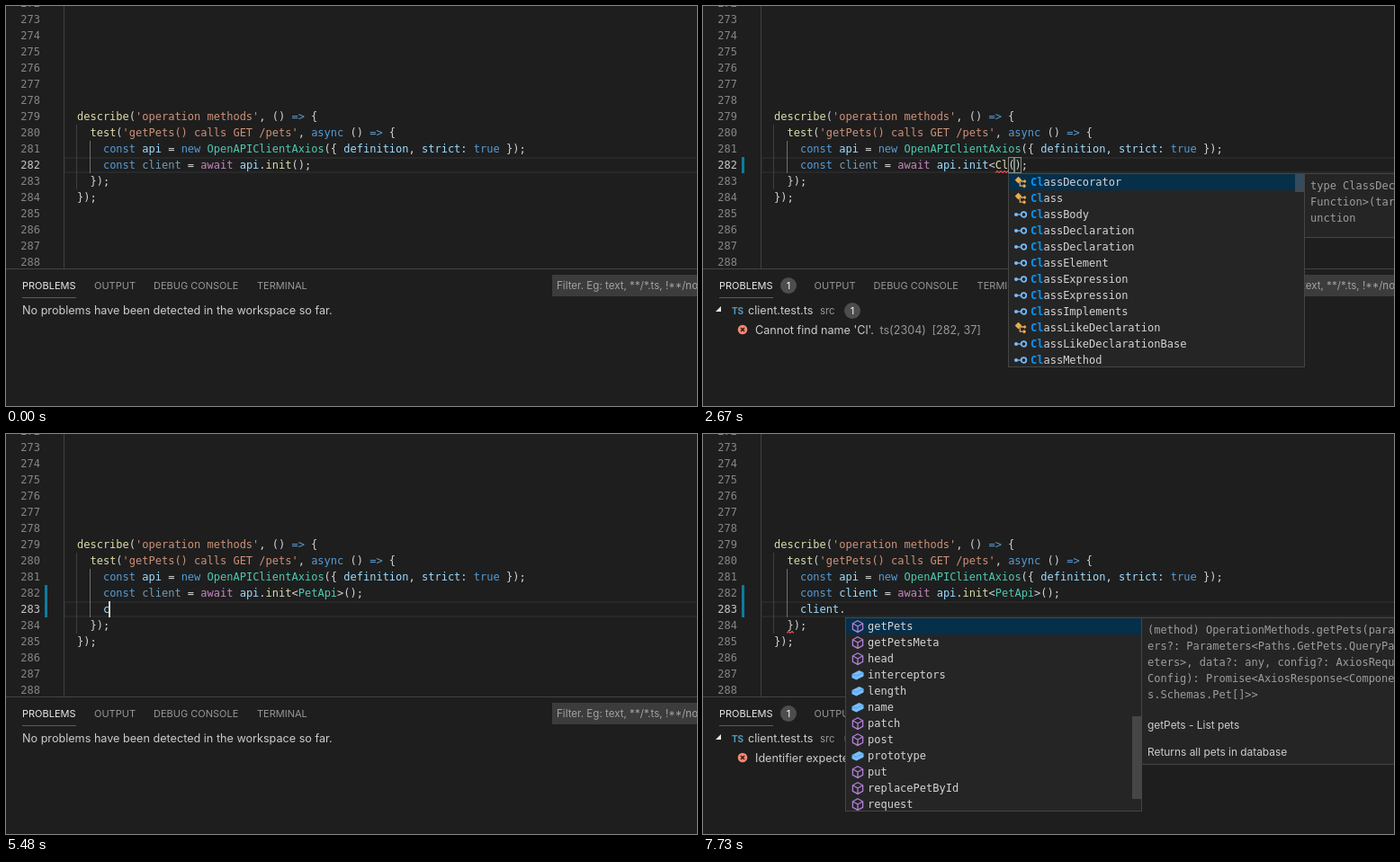
Write an HTML page that moves like this. It is 768 by 445 pixels and loops after 8000 ms.

```html
<!DOCTYPE html>
<html lang="en">
<head>
<meta charset="utf-8">
<title>Typed API client</title>
<style>
html, body { margin: 0; width: 100%; height: 100%; overflow: hidden; background: #1e1e1e; }
#stage { position: relative; width: 768px; height: 445px; overflow: hidden; background: #1e1e1e; color: #ccc; }
#stage div, #stage svg { position: absolute; box-sizing: border-box; }
.text { line-height: 18px; white-space: pre; }
.mono { font: 12px/18px "DejaVu Sans Mono", monospace; }
.ui { font: 12.64px/18px Inter, sans-serif; }
.doc { font: 11.9px/18px Inter, sans-serif; }
.tab { font: 11px/18px Inter, sans-serif; color: #979797; }
.on { color: #e7e7e7; }
.src { font-size: 11.4px; color: #979797; }
.filter { font: 11.6px/18px Inter, sans-serif; color: #a2a2a2; }
.ts { font: 700 10px/18px Inter, sans-serif; color: #519aba; }
.num { color: #858585; }
.num.now { color: #c6c6c6; }
.code { color: #d4d4d4; }
.dim { color: #9d9d9d; }
.gap { color: #979797; margin-left: 6.5px; }
.badge { width: 18px; height: 18px; border-radius: 9px; background: #4d4d4d; color: #fff;
  font: 11px/18px Inter, sans-serif; text-align: center; }
.editor { left: 0; top: 0; width: 768px; height: 292px; overflow: hidden; }
.box { background: #252526; border: 1px solid #454545; }
.clip { overflow: hidden; }
.current { border: 2px solid #282828; }
.pair { border: 1px solid #888; background: rgba(0, 100, 0, .1); }
.block { background: #aeafad; color: #1e1e1e; }
#stage i { font-style: normal; }
#stage em { font-style: italic; }
.k { color: #569cd6; } .f { color: #dcdcaa; } .s { color: #ce9178; } .v { color: #9cdcfe; }
.t { color: #4ec9b0; } .c { color: #c586c0; } .u { color: #729db3; }
.b { color: #0097fb; font-weight: bold; }
</style>
</head>
<body>
<div id="stage"></div>
<script>
const LOOP = 8000, CH = 7.224, LEFT = 64.55;
const stage = document.getElementById('stage');

const colX = col => LEFT + col * CH;
const rowY = row => 168 + (row - 282) * 18;
const esc = s => s.replace(/&/g, '&amp;').replace(/</g, '&lt;');
const MARK = /\[(\w) ([^\]]*)\]/g;
const paint = s => esc(s).replace(MARK, '<i class="$1">$2</i>');
const plain = s => s.replace(MARK, '$2');

const rect = (x, y, w, h, cls = '', fill = '', inner = '') =>
  `<div class="${cls}" style="left:${x}px;top:${y}px;width:${w}px;height:${h}px;${fill && 'background:' + fill}">${inner}</div>`;
// text whose line is centred on y
const text = (x, y, cls, html) =>
  `<div class="text ${cls}" style="left:${x}px;top:${y - 9}px">${html}</div>`;
const svg = (x, y, w, h, body) =>
  `<svg style="left:${x}px;top:${y}px" width="${w}" height="${h}" fill="none">${body}</svg>`;

const path = (d, stroke, fill = 'none', w = 1.3) =>
  `<path d="${d}" stroke="${stroke}" fill="${fill}" stroke-width="${w}"/>`;
const ICONS = {
  c: path('M5.5 1.8L9.3 5.6 5.5 9.4 1.7 5.6zM12.5 5l2 2-2 2-2-2zM12 10l2.2 2.2-2.2 2.2-2.2-2.2z', 'none', '#e8ab53') +
     path('M8 7h3M7.3 7.5v4.7h3', '#e8ab53'),
  i: '<circle cx="3" cy="8" r="2" fill="#75beff"/><circle cx="11.5" cy="8" r="2.8" stroke="#75beff" stroke-width="1.7"/>' +
     path('M4 8h5', '#75beff'),
  n: '<rect x="2.6" y="3" width="11" height="10" rx="1" stroke="#c3d9ec" stroke-width="1.2"/>' +
     path('M5 6.5h6M5 9.5h6', '#75beff'),
  m: path('M8 1.7L13.6 4.8v6.5L8 14.4 2.4 11.3V4.8zM2.4 4.8L8 8l5.6-3.2M8 8v6.4', '#b180d7'),
  p: path('M1.5 7l8-4 5 2.2v4.2l-8 4-5-2.2z', 'none', '#75beff') + path('M2 7.2l4.5 2 7.5-3.8', '#4d92cc', 'none', .8),
  a: path('M4 3.5H1.7v9H4M12 3.5h2.3v9H12', '#c3d9ec') + path('M4.2 7.6l4.3-2.2 3.2 1.4v2.6l-4.3 2.1-3.2-1.4z', 'none', '#75beff')
};

// each entry: icon letter, then the label with matched letters in brackets
const LISTS = {
  cl: {
    thumb: [0, 20],
    items: ['c[Cl]assDecorator', 'c[Cl]ass', 'i[Cl]assBody', 'i[Cl]assDeclaration', 'i[Cl]assDeclaration',
      'i[Cl]assElement', 'i[Cl]assExpression', 'i[Cl]assExpression', 'i[Cl]assImplements',
      'c[Cl]assLikeDeclaration', 'i[Cl]assLikeDeclarationBase', 'i[Cl]assMethod'],
    info: ['type ClassDecorator = <TF', 'Function>(target: TFunct', 'unction']
  },
  pet: {
    thumb: [0, 20],
    items: ['a[Pet]Api', 'n[pet]Id', 'nexample[Pet]APIJSON', 'nexample[Pet]APIYAML', 'c[P]ath[Te]mplate',
      'i[Pe]erCer[t]ificate', 'i[Pe]rformanceNode[T]iming', 'i[P]ipelin[eT]opicExpression',
      'm[p]ipelin[eT]opicExpression', 'i[Pe]rformanceEn[t]ry', 'c[P]aram[et]erDecorator', 'c[P]aram[et]ers'],
    info: ['(alias) type PetApi', 'rationMethods', 'api: OpenAPIClient', '}', 'import PetApi']
  },
  client: {
    thumb: [0, 72],
    items: ['n[client]', 'c[Client]Request', 'n[CLIENT]_RENEG_LIMIT', 'n[CLIENT]_RENEG_WINDOW',
      'm[cle]ar[Int]erval', 'm[cle]ar[Int]erval', 'mcreate[Client]', 'nSSL_OP_SSLEAY_080_[CLIENT]_DH_BUG',
      'm[cl]ass[I]mplem[ent]s', 'm[c]reate[Li]t[e]ral[T]ype[N]ode', 'mis[Cl]ass[I]mplem[ent]s', 'm[c]omp[ile]Fu[n]c[t]ion'],
    info: ['const client: OpenAPIClient<OperationMeth', 'ods>']
  },
  members: {
    thumb: [109, 92],
    items: ['mgetPets', 'mgetPetsMeta', 'mhead', 'pinterceptors', 'plength', 'pname', 'mpatch', 'mpost',
      'pprototype', 'mput', 'mreplacePetById', 'mrequest'],
    info: ['(method) OperationMethods.getPets(paramet', 'ers?: Parameters<Paths.GetPets.QueryParam',
      'eters>, data?: any, config?: AxiosRequest', 'Config): Promise<AxiosResponse<Component', 's.Schemas.Pet[]>>'],
    doc: ['getPets - List pets', 'Returns all pets in database']
  }
};

const cannotFind = name => [`Cannot find name '${name}'.`, 2304, '282, 37'];

// caret: 0 hidden, 1 bar, 2 block
const STEPS = [
  [0, { arg: '', at: 31, caret: 0, call: null, mod: 0, prob: null, wave: null, hint: 0, pop: null, info: 0, used: 0 }],
  [150, { caret: 2 }],
  [600, { caret: 0 }],
  [1050, { caret: 2 }],
  [1200, { at: 35 }],
  [1350, { caret: 1 }],
  [1640, { arg: '<', at: null }],
  [1790, { hint: 1 }],
  [1930, { prob: ['Expression expected.', 1109, '282, 38'], wave: [282, 37, 1], mod: 1 }],
  [2080, { arg: '<C', wave: [282, 38, 1] }],
  [2220, { arg: '<Cl', wave: [282, 39, 1] }],
  [2370, { hint: 0, pop: 'cl' }],
  [2520, { info: 1 }],
  [2670, { prob: cannotFind('Cl'), wave: [282, 36, 2], caret: 0 }],
  [2820, { arg: '<C', wave: [282, 36, 1], caret: 1 }],
  [2970, { arg: '<', pop: null, info: 0 }],
  [3110, { arg: '<P', wave: [282, 37, 1] }],
  [3260, { arg: '<Pe', wave: [282, 38, 1], pop: 'pet' }],
  [3400, { arg: '<Pet', wave: [282, 39, 1], info: 1 }],
  [3700, { arg: '<PetApi', wave: [282, 36, 6], pop: null, info: 0, prob: cannotFind('Pet') }],
  [4150, { caret: 0, prob: ["'PetApi' only refers to a type, but is being used as a value here.", 2693, '282, 37'] }],
  [4300, { arg: '<PetApi>', caret: 1 }],
  [4590, { prob: null, wave: null }],
  [4740, { caret: 2, at: 42 }],
  [4890, { caret: 1, at: null, call: '', mod: 2 }],
  [5180, { caret: 0 }],
  [5480, { call: 'c', caret: 1 }],
  [5630, { call: 'cl' }],
  [5780, { call: 'clie', pop: 'client' }],
  [5930, { call: 'clien', info: 1 }],
  [6080, { call: 'client' }],
  [6230, { call: 'client.', pop: 'members' }],
  [6530, { used: 1 }],
  [6680, { caret: 0, prob: ['Identifier expected.', 1003, '284, 5'], wave: [284, 4, 1] }],
  [7130, { caret: 1 }],
  [7730, { caret: 0 }]
];
let last = {};
const states = STEPS.map(([time, change]) => ({ time, state: last = { ...last, ...change } }));

function initCall(arg) {
  if (!arg) return '[f init]';
  if (arg.endsWith('>')) return `[f init]<[t ${arg.slice(1, -1)}]>`;
  return `[v init]<[f ${arg.slice(1)}]`;
}

function codeLines(s) {
  const lines = [
    "  [f describe]([s 'operation methods'], () [k =>] {",
    "    [f test]([s 'getPets() calls GET /pets'], [k async] () [k =>] {",
    '      [k const] [v api] = [k new] [t OpenAPIClientAxios]({ [v definition], [v strict:] [k true] });',
    `      [k const] [${s.used ? 'v' : 'u'} client] = [c await] [v api].${initCall(s.arg)}();`
  ];
  if (s.call !== null) lines.push('      ' + s.call.replace('client', '[v client]').replace(/^c\w*$/, '[v $&]'));
  return [...lines, '    });', '  });'];
}

function cursorOf(s) {
  if (s.call !== null) return { row: 283, col: 6 + s.call.length };
  return { row: 282, col: s.at ?? 35 + s.arg.length };
}

function squiggle([row, col, len]) {
  const w = len * CH;
  let d = 'M0 2.5';
  for (let x = 0; x < w; x += 4) d += 'l2 -2l2 2';
  return svg(colX(col), rowY(row) + 15, w, 3, path(d, '#f14c4c', 'none', 1.1));
}

function editor(s) {
  const { row, col } = cursorOf(s), lines = codeLines(s);
  const y = rowY(row), extra = s.call === null ? 0 : 18;
  let out = rect(64, y, 720, 18, 'current') +
    rect(64, 0, 1, 292, '', '#404040') +
    rect(78, 132, 1, 72 + extra, '', '#404040') +
    rect(93, 150, 1, 36 + extra, '', '#707070');
  for (let n = 272; n <= 288; n++) {
    out += text(16.3, rowY(n) + 9, 'mono num' + (n === row ? ' now' : ''), n);
  }
  if (s.mod) out += rect(43, 168, 3, 18 * s.mod, '', '#0c7d9d');
  const current = plain(lines[row - 279]);
  if (s.caret !== 0 || s.at === null) {
    if (current[col] === '(') out += [0, 1].map(i => rect(colX(col + i), y, CH, 18, 'pair')).join('');
  }
  lines.forEach((line, i) => out += text(LEFT, rowY(279 + i) + 9, 'mono code', paint(line)));
  if (s.wave) out += squiggle(s.wave);
  if (s.caret === 1) out += rect(Math.floor(colX(col) - 1), y, 2, 18, '', '#d0d0ce');
  if (s.caret === 2) out += rect(colX(col), y, 7, 18, 'mono block', '', esc(current[col]));
  return `<div class="editor">${out}</div>`;
}

function panel(s) {
  const shift = s.prob ? 25.6 : 0;
  let out = rect(0, 292, 768, 1, '', '#434343') +
    text(18, 311, 'tab on', 'PROBLEMS') + rect(18, 324, 60, 1, '', '#5c5c5c') +
    text(98 + shift, 311, 'tab', 'OUTPUT') +
    text(164 + shift, 311, 'tab', 'DEBUG CONSOLE') +
    text(279 + shift, 311, 'tab', 'TERMINAL') +
    rect(607, 299, 200, 24, '', '#3c3c3c') +
    text(612, 311, 'filter', 'Filter. Eg: text, **/*.ts, !**/node_modules/**');
  if (!s.prob) return out + text(18, 339, 'ui', 'No problems have been detected in the workspace so far.');
  const [msg, code, place] = s.prob;
  return out + rect(86, 302, 18, 18, 'badge', '', '1') +
    svg(14, 334, 7, 7, path('M6 0V6H0z', 'none', '#e8e8e8')) +
    text(32, 339, 'ts', 'TS') + text(50, 339, 'ui', 'client.test.ts') +
    text(130, 339, 'ui src', 'src') + rect(157, 330, 18, 18, 'badge', '', '1') +
    svg(38, 354, 12, 12, '<circle cx="6" cy="6" r="5.3" fill="#f48771"/>' +
      path('M4 4l4 4M8 4l-4 4', '#1e1e1e', 'none', 1.5)) +
    text(58, 361, 'ui', `${msg}<i class="gap">ts(${code})</i><i class="gap">[${place}]</i>`);
}

function hint(x) {
  const p = x + 6;
  return rect(x, -40, 460, 210, 'box') +
    text(p, 7, 'mono', '<b><u>client-axios/src/index").UnknownOperationMethods></u></b>>():') +
    text(p, 25, 'mono', 'Promise&lt;Client>') +
    rect(x, 38, 460, 1, '', '#454545') +
    text(p, 56, 'doc', 'Initalizes OpenAPIClientAxios.') +
    text(p, 82, 'doc', 'The init() method should be called right after creating a new instance of\nOpenAPIClientAxios') +
    text(p, 126, 'doc', '<em>@returns</em> — AxiosInstance') +
    text(p, 152, 'doc', '<em>@memberof</em> — OpenAPIClientAxios');
}

// highlight at most n of the bracketed letters
function label(s, n) {
  return s.replace(/\[(\w+)\]/g, (_, m) => {
    const hit = m.slice(0, Math.max(n, 0));
    n -= m.length;
    return `<i class="b">${hit}</i>${m.slice(hit.length)}`;
  });
}

function suggest(s, x, y) {
  const { items, thumb, info, doc } = LISTS[s.pop];
  const typed = s.call === null ? s.arg.length - 1 : s.call.length;
  let rows = rect(0, 0, 328, 18, '', '#062f4a');
  items.forEach((item, i) => {
    rows += svg(5, i * 18 + 1, 16, 16, ICONS[item[0]]) +
      text(24, i * 18 + 9, 'mono code', label(item.slice(1), typed));
  });
  rows += rect(318, thumb[0], 10, thumb[1], '', 'rgba(121,121,121,.4)');
  let out = '';
  if (s.info) {
    out += rect(x + 329, y, 460, doc ? 164 : info.length * 18 + 18, 'box') +
      text(x + 336, y + 14, 'mono dim', esc(info.join('\n')));
    if (doc) doc.forEach((line, i) => out += text(x + 336, y + 120 + i * 30, 'doc', line));
  }
  return out + rect(x, y, 330, 216, 'box clip', '', rows);
}

function view(s) {
  const { row, col } = cursorOf(s), x = Math.floor(colX(col));
  return editor(s) + panel(s) + (s.hint ? hint(x) : '') + (s.pop ? suggest(s, x, rowY(row) + 18) : '');
}

let shown;
function tick() {
  const t = performance.now() % LOOP;
  const { state } = states.findLast(e => e.time <= t);
  if (state !== shown) stage.innerHTML = view(shown = state);
  requestAnimationFrame(tick);
}
tick();
</script>
</body>
</html>
```
